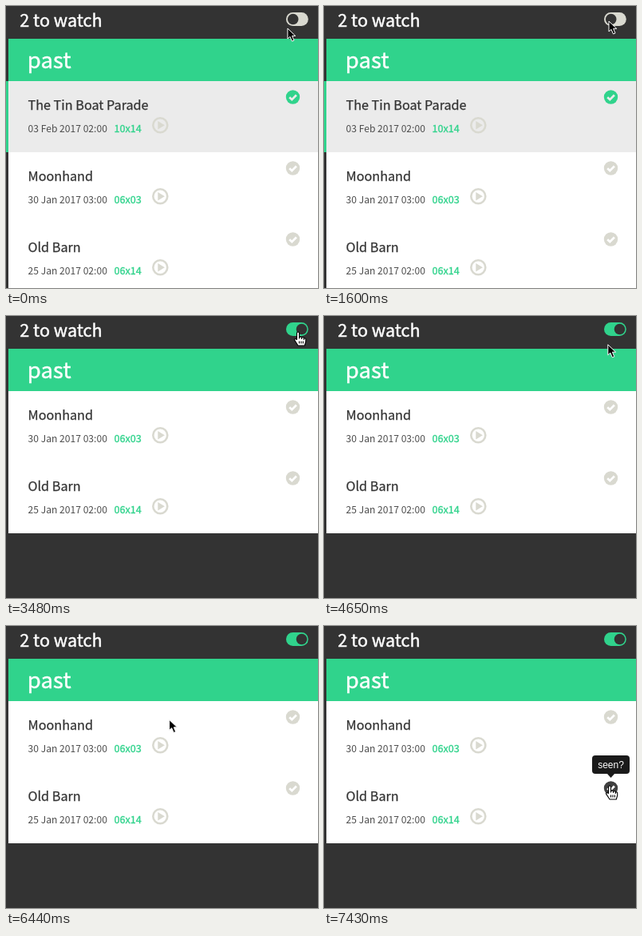
An HTML page that plays this animation: 391 by 353 pixels, repeating every 8000 ms.

```html
<!DOCTYPE html>
<html lang="en">
<head>
<meta charset="utf-8">
<title>Watch list</title>
<style>
  html, body { margin: 0; width: 100%; height: 100%; overflow: hidden; background: #333; }
  svg { display: block; cursor: default; font-family: "Noto Sans CJK JP", "Noto Sans CJK SC", "Noto Sans CJK", "Open Sans", sans-serif; }
  .head { fill: #fff; stroke: #fff; stroke-width: .45; }
  .title { font-size: 16.2px; fill: #333; stroke: #333; stroke-width: .25; }
  .date { font-size: 12.1px; font-weight: 300; fill: #4c4c4c; }
  .episode { font-size: 12.6px; fill: #30d38c; stroke: #30d38c; stroke-width: .35; }
  .tip { font: 12px "Liberation Sans", Arial, sans-serif; fill: #fff; text-anchor: middle; }
</style>
</head>
<body>
<svg width="391" height="353" viewBox="0 0 391 353">
  <rect width="391" height="353" fill="#333"/>
  <text class="head" x="17.3" y="25.5" font-size="21.6">2 to watch</text>
  <g id="toggle">
    <rect x="351" y="8" width="27.8" height="17" rx="8.5"/>
    <circle id="knob" cy="16.5" r="6.8" fill="#333"/>
  </g>
  <rect x="3" y="41" width="388" height="53" fill="#30d38c"/>
  <text class="head" x="26.8" y="78" font-size="27.5">past</text>
  <g id="rows"></g>
  <g id="tooltip">
    <path d="M354.5 184.5h10l-5 5.5z" fill="#1a1a1a"/>
    <rect x="336" y="162" width="47" height="23" rx="4" fill="#1a1a1a"/>
    <text class="tip" x="359.5" y="178">seen?</text>
  </g>
  <g id="cursor" stroke-linejoin="round">
    <path id="arrow" d="M0 1V14L3 11.3L5.5 17L8 16L5.6 10.4H9.8Z" fill="#000" stroke="#fff"/>
    <g id="hand" stroke="#000" stroke-width="1.1">
      <path d="M-1.5 9V1a1.5 1.5 0 0 1 3 0V6q2.5-1.4 3 .6q2.4-1 2.8.9q2.4-.6 2.4 1.5V11.5L8.3 16.5H0L-4.6 9.4q.8-2.4 3.1-.4z" fill="#fff"/>
      <path d="M1.5 6v2m3-1.4v2m2.8-1v2M1.5 11v3m2.4-3v3m2.4-3v3" fill="none"/>
    </g>
    <g id="beam" fill="none">
      <path id="bar" d="M-3-7Q-.4-7 0-5.5Q.4-7 3-7M0-5.5V5.5M-3 7Q-.4 7 0 5.5Q.4 7 3 7M-1.8 2.5H1.8" stroke="#bbb" stroke-width="2"/>
    </g>
  </g>
</svg>
<script>
const LOOP = 8000, ROW = 89, GREEN = '#30d38c', CREAM = 217, DARK = 64;
const $ = id => document.getElementById(id);
const clamp = x => Math.max(0, Math.min(1, x));
const mix = (a, b, u) => a + (b - a) * u;
const ease = u => mix(u, u * u * (3 - 2 * u), 0.6);
const show = (id, on) => $(id).setAttribute('visibility', on ? 'visible' : 'hidden');
const place = (id, x, y) => $(id).setAttribute('transform', `translate(${x} ${y})`);

// icon colour, from cream at rest to dark under the pointer
function tint(u) {
  const c = mix(CREAM, DARK, u);
  return `rgb(${c}, ${c}, ${c - 9 * (1 - u)})`;
}

const shows = [
  ['The Tin Boat Parade', '03 Feb 2017 02:00', '10x14'],
  ['Moonhand', '30 Jan 2017 03:00', '06x03'],
  ['Old Barn', '25 Jan 2017 02:00', '06x14']
];

$('rows').innerHTML = shows.map(([title, date, episode], i) => {
  const bg = i ? '#fff' : '#ebebeb';
  return `<g id="row${i}">
    <rect x="3" width="388" height="${ROW}" fill="${bg}"/>
    ${i ? '' : `<rect width="3" height="${ROW}" fill="${GREEN}"/>`}
    <text class="title" x="27.5" y="36">${title}</text>
    <text class="date" x="27.6" y="64">${date}</text>
    <text class="episode" x="135.5" y="64">${episode}</text>
    <g transform="translate(193.3 55.3)" fill="${tint(0)}">
      <circle r="9" fill="none" stroke="${tint(0)}" stroke-width="2.6"/>
      <path d="M-3-5.2L5.6 0L-3 5.2Z"/>
    </g>
    <g transform="translate(359.5 20)">
      <circle id="check${i}" r="8.7" fill="${i ? tint(0) : GREEN}"/>
      <path d="M-4.3.2L-1.2 3.2L4.4-2.5" fill="none" stroke="${bg}" stroke-width="2.7"/>
    </g>
  </g>`;
}).join('');

const bar = $('bar').cloneNode();
bar.setAttribute('stroke', '#111');
bar.setAttribute('stroke-width', 1);
$('beam').append(bar);

// pointer moves: begin, end, and where it comes to rest
const moves = [
  [0, 160, 334, 45],
  [1270, 1600, 357, 18],
  [2710, 2940, 366, 20.5],
  [3960, 4190, 358, 30],
  [4520, 4830, 352.5, 42],
  [5370, 5660, 97, 30],
  [6050, 6860, 322.5, 211],
  [6890, 6970, 323.5, 227],
  [7120, 7430, 358, 200.5]
];

function pointer(t) {
  let x = 353, y = 27;
  for (const [begin, end, toX, toY] of moves) {
    const u = ease(clamp((t - begin) / (end - begin)));
    x = mix(x, toX, u);
    y = mix(y, toY, u);
  }
  return [x, y];
}

function draw(t) {
  const on = t >= 3480, hover = clamp((t - 2740) / 200), seen = clamp((t - 7300) / 130);
  $('toggle').setAttribute('fill', on ? GREEN : tint(hover));
  $('knob').setAttribute('cx', on ? 370.5 : 359.7);
  show('row0', !on);
  shows.forEach((_, i) => place('row' + i, 0, 94 + (i - on) * ROW));
  $('check2').setAttribute('fill', tint(seen));
  $('tooltip').setAttribute('opacity', seen);

  const [x, y] = pointer(t);
  const hand = t >= 2740 && t < 4050 || t >= 7300, beam = !hand && x < 122;
  place('cursor', x, y);
  show('hand', hand);
  show('beam', beam);
  show('arrow', !hand && !beam);
}

const start = performance.now();
function tick() {
  draw((performance.now() - start) % LOOP);
  requestAnimationFrame(tick);
}
tick();
</script>
</body>
</html>
```
